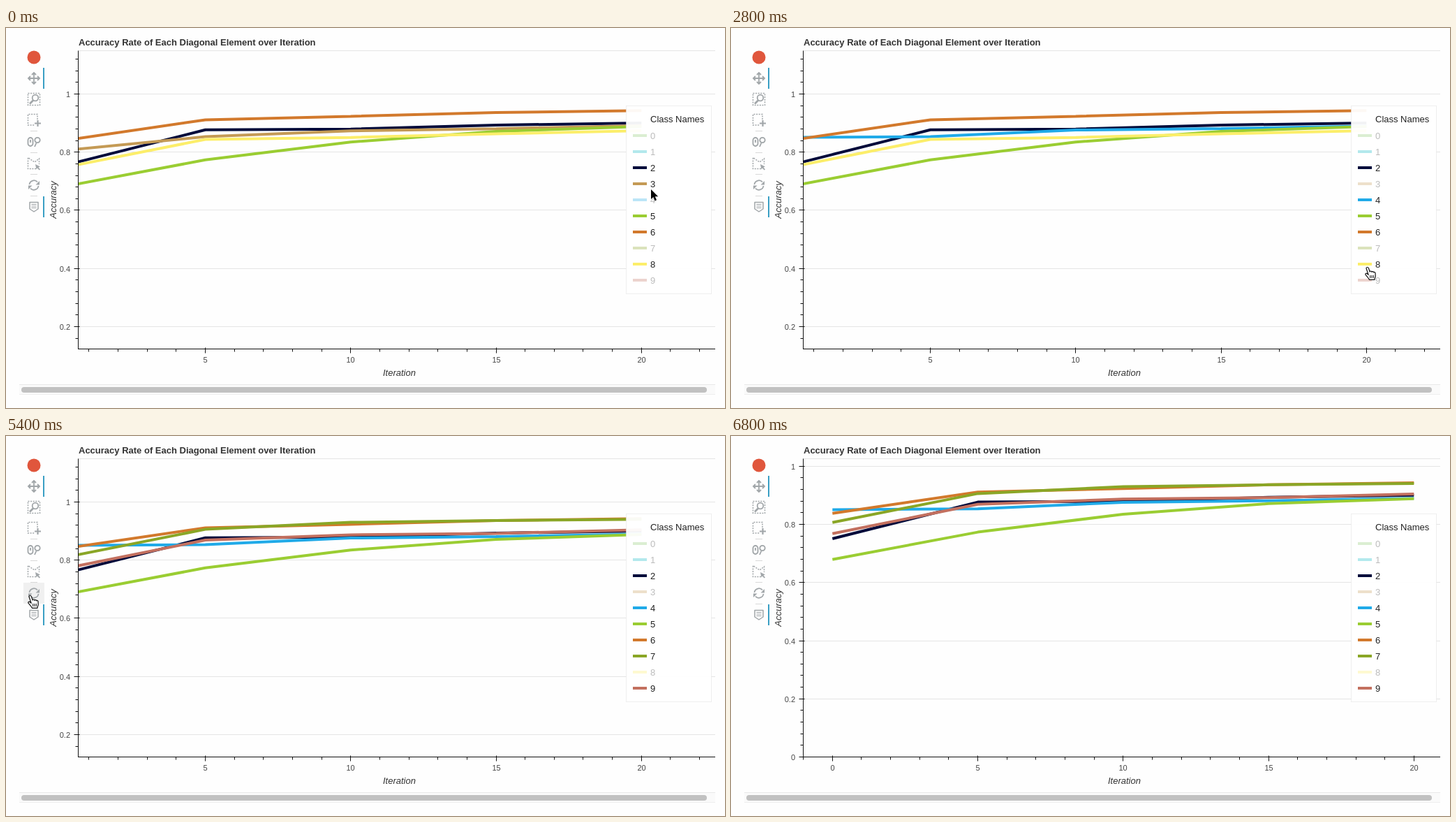
An HTML page for the animation above (7 s loop, 1030 by 544 pixels).

```html
<!DOCTYPE html>
<html lang="en">
<head>
<meta charset="utf-8">
<title>Accuracy chart</title>
<style>
  html, body { margin: 0; width: 100%; height: 100%; overflow: hidden; background: #fefefe; }
  svg { display: block; font: 13px "Liberation Sans", Arial, sans-serif; fill: #222; }
  .tick { font-size: 11px; fill: #444; }
  .title { font-weight: bold; fill: #333; }
  .axis { font-style: italic; fill: #333; }
  .icon { fill: none; stroke: #a1a6a9; stroke-width: 1.8; }
  .dash { stroke-width: 1.5; stroke-dasharray: 2 1.6; }
  .solid { fill: #a1a6a9; stroke: none; }
</style>
</head>
<body>
<svg id="stage" width="1030" height="544" viewBox="0 0 1030 544"></svg>
<script>
const LOOP = 7000, STEP = 200, RESET = 5600;
const UNIT_X = 41.65, UNIT_Y = 416.2;
const LEFT = 103.5, RIGHT = 1016, TOP = 32.5, BOTTOM = 459.5;

// colour, line heights at iterations 0, 5, 10, 15, 20, and toggle time
const series = [
  { color: '#8aca6c' },
  { color: '#08b9c6' },
  { color: '#000a3a', ys: [147, 94.6, 93.5, 87.8, 84.8], on: true },
  { color: '#c49a55', ys: [124.6, 104.4, 96, 93, 88.5], on: true, flip: 1000 },
  { color: '#20aae8', ys: [105.4, 104.3, 94.9, 92.7, 89.3], flip: 2000 },
  { color: '#9acd32', ys: [176.8, 137.6, 112, 96.8, 89.8], on: true },
  { color: '#d2792c', ys: [110.8, 80.2, 75.2, 69.8, 67], on: true },
  { color: '#8aa626', ys: [123.8, 82.4, 72.4, 69.8, 68], flip: 3800 },
  { color: '#fcee6a', ys: [149.6, 108.3, 105.5, 100.4, 95.8], on: true, flip: 3200 },
  { color: '#c3705f', ys: [139.8, 97.8, 90.3, 88.2, 83], flip: 4200 }
];

// pointer tip: time, x, y
const path = [
  [0, 924, 231], [400, 924, 231], [1000, 920, 225], [1400, 919, 232], [1800, 917, 252],
  [2200, 916, 250], [2800, 912, 343], [3200, 912, 338], [3800, 911, 316],
  [4200, 912, 361], [4400, 911, 361], [4800, 140, 265], [5200, 37, 231],
  [5400, 35, 229], [5600, 37, 228], [7000, 37, 228]
];
const HAND_FROM = 600, HOVER_FROM = 5200, LEAVE = 6400;

const crisp = v => Math.floor(v) + 0.5;
const line = (x1, y1, x2, y2, color = '#111', w = 1) =>
  `<path d="M${x1} ${y1}L${x2} ${y2}" stroke="${color}" stroke-width="${w}" fill="none"/>`;
const text = (x, y, s, cls = '', anchor = 'start', more = '') =>
  `<text x="${x}" y="${y}" class="${cls}" text-anchor="${anchor}" ${more}>${s}</text>`;
const rect = (x, y, w, h, fill, more = '') =>
  `<rect x="${x}" y="${y}" width="${w}" height="${h}" fill="${fill}" ${more}/>`;

function plot(id, x0, y0) {
  let grid = '', axes = line(LEFT, TOP, LEFT, BOTTOM + .5) + line(LEFT - .5, BOTTOM, RIGHT, BOTTOM);
  for (let i = 0; i <= 30; i++) {
    const y = crisp(y0 - i * 0.04 * UNIT_Y), major = i % 5 === 0;
    if (y > BOTTOM || y < TOP) continue;
    axes += line(LEFT - (major ? 6 : 4), y, LEFT + (major ? 2 : 0), y);
    if (!major) continue;
    if (y < BOTTOM) grid += line(LEFT, y, RIGHT, y, '#e5e5e5');
    axes += text(92, y + 4, +(i / 25).toFixed(1), 'tick', 'end');
  }
  for (let i = -1; i <= 22; i++) {
    const x = crisp(x0 + i * UNIT_X), major = i % 5 === 0;
    if (x < LEFT || x > RIGHT) continue;
    axes += line(x, BOTTOM - (major ? 2 : 0), x, BOTTOM + (major ? 6 : 4));
    if (major) axes += text(x, 479, i, 'tick', 'middle');
  }
  const lines = series.map((s, k) => s.ys ? `<polyline class="s${k}" fill="none" stroke="${s.color}"
    stroke-width="4" stroke-linejoin="bevel" points="${s.ys.map((y, i) =>
      `${x0 + i * 5 * UNIT_X},${y + y0 - BOTTOM}`).join(' ')}"/>` : '').join('');
  return `<g id="${id}">${grid}${axes}<g clip-path="url(#area)">${lines}</g></g>`;
}

function legend() {
  const items = series.map((s, k) => {
    const y = 154 + 23 * k;
    return `<g id="item${k}">${line(898, y, 918, y, s.color, 4)}${text(923, y + 4.5, k)}</g>`;
  }).join('');
  return rect(888.5, 111.5, 122, 269, '#fff', 'fill-opacity=".95" stroke="#e5e5e5" stroke-opacity=".6"') +
    text(923, 135, 'Class Names') + items;
}

function toolbar() {
  const icons = [
    '<path d="M-8 0H8M0-8V8M-5-3L-8 0L-5 3M5-3L8 0L5 3M-3-5L0-8L3-5M-3 5L0 8L3 5"/>',
    '<path class="dash" d="M-8.5-8.5H8.5V8.5H-8.5Z"/><circle cx="2" cy="-2" r="4.3"/><path d="M-1 1.5L-6 6.5" stroke-width="2.6"/>',
    '<path class="dash" d="M5-1V-8.5H-8.5V7H1"/><path d="M5.5 0V9M1 4.5H10" stroke-width="2.2"/>',
    '<rect x="-8.5" y="-6" width="7" height="12" rx="3.5"/><path d="M-5-3V1M3.5 1.5L1 7"/><circle cx="5" cy="-2.5" r="3.7"/>',
    '<path class="dash" d="M3 7.5H-8.5V-8.5L1-2L7.5-7V1"/><path class="solid" d="M2 1L9 4.5L6.5 5.5L9 8.5L7.5 9.5L5 6.5L3.5 8.5Z"/>',
    '<path d="M-6.5-1A6.6 6.6 0 0 1 5-4.5M6.5 1A6.6 6.6 0 0 1-5 4.5"/><path class="solid" d="M8-6V-.5H2.5ZM-8 6V.5H-2.5Z"/>',
    '<path d="M-6-6.5H6V3L0 7L-6 3Z" stroke-width="1.5" stroke-linejoin="round"/><path d="M-3.5-3.5H3.5M-3.5-1H3.5M-3.5 1.5H3.5" stroke-width="1.2"/>'
  ];
  const ys = [72, 102, 132, 163, 194, 225, 256];
  return '<circle cx="40" cy="42" r="9.5" fill="#e0563c"/>' +
    rect(25, 210, 30, 30, '#f0f0f0', 'id="hover"') +
    icons.map((d, i) => `<g class="icon" transform="translate(40 ${ys[i]})">${d}</g>`).join('') +
    [147.5, 178.5, 209.5, 240.5].map(y => line(35, y, 45, y, '#d8d8d8')).join('') +
    [57, 241].map(y => rect(53, y, 2, 30, '#3a9fc4')).join('');
}

const arrow = `<path id="arrow" d="M0 0V14L3.3 11L5.6 16.4L8 15.3L5.8 10.2H10.2Z" fill="#000"
  stroke="#fff" stroke-width="1" paint-order="stroke"/>`;
const hand = `<g id="hand" stroke="#111" stroke-width="1.2" stroke-linejoin="round">
  <path fill="#fff" d="M-2 1c0-2 3-2 3.5 0l1.6 5c.5-1.5 2.5-1.2 2.8.3 .6-1.2 2.4-.8 2.7.6 .8-.9 2.2-.2 2.4 1l.2 4c0 2-1 2.5-1.3 5.5h-7.5c-.5-2-3-4-5.2-7-1.2-1.7.8-3 2.3-1.6l1.6 1.5z"/>
  <path fill="none" stroke-width="1" d="M3.7 11V15M6 11V15M8.3 11V15"/></g>`;

document.getElementById('stage').innerHTML =
  `<clipPath id="area"><rect x="104" y="32" width="912" height="428"/></clipPath>` +
  text(104, 25, 'Accuracy Rate of Each Diagonal Element over Iteration', 'title') +
  line(LEFT, TOP, RIGHT, TOP, '#e5e5e5') +
  plot('panned', 77.3, 510.7) + plot('home', 145.3, BOTTOM) +
  text(563.5, 498, 'Iteration', 'axis', 'middle') +
  text(0, 0, 'Accuracy', 'axis', 'middle', 'transform="translate(72 246) rotate(-90)"') +
  legend() + toolbar() +
  rect(19, 510, 997, 15, '#fafafa') +
  line(19, 510.5, RIGHT, 510.5, '#e8e8e8') + line(19, 524.5, RIGHT, 524.5, '#eee') +
  rect(22, 514, 982, 8, '#c1c1c1', 'rx="4"') +
  `<g id="pointer">${arrow}${hand}</g>`;

const el = id => document.getElementById(id);
const show = (node, on) => { node.style.display = on ? '' : 'none'; };

function tip(t) {
  const i = path.findIndex(p => p[0] > t);
  const [t0, x0, y0] = path[i - 1], [t1, x1, y1] = path[i];
  const u = (t - t0) / (t1 - t0), e = u * u * (3 - 2 * u);
  return [x0 + (x1 - x0) * e, y0 + (y1 - y0) * e];
}

function draw(t) {
  show(el('panned'), t < RESET);
  show(el('home'), t >= RESET);
  series.forEach((s, k) => {
    const on = !!s.on !== (s.flip !== undefined && t >= s.flip);
    el('item' + k).setAttribute('opacity', on ? 1 : 0.3);
    document.querySelectorAll('.s' + k).forEach(n => show(n, on));
  });
  show(el('hover'), t >= HOVER_FROM && t < LEAVE);
  show(el('pointer'), t < LEAVE);
  show(el('arrow'), t < HAND_FROM);
  show(el('hand'), t >= HAND_FROM);
  el('pointer').setAttribute('transform', `translate(${tip(t)})`);
}

const start = performance.now();
let last = -1;
function frame() {
  const t = Math.floor((performance.now() - start) % LOOP / STEP) * STEP;
  if (t !== last) draw(last = t);
  requestAnimationFrame(frame);
}
frame();
</script>
</body>
</html>
```
